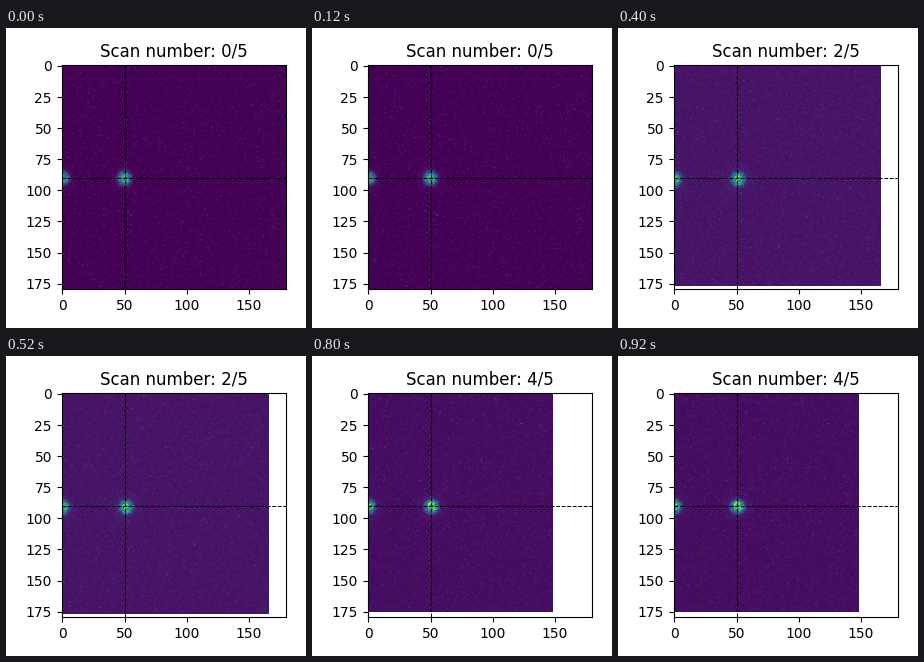
Write a matplotlib script that moves like this. It is 300 px wide and 300 px high and loops after 1 s.

```python
import numpy as np
import matplotlib.pyplot as plt
from matplotlib.animation import FuncAnimation

SIZE = 180
SCANS = 5


def scan_shape(n):
    """Rows and columns left after n scans."""
    cols = min(SIZE, round(183 - 8.7 * n))
    rows = SIZE - round(2.8 * n ** 0.18)
    return rows, cols


def spot(x, y, cx, cy):
    """Flat-topped core with a faint halo."""
    r2 = (x - cx) ** 2 + (y - cy) ** 2
    return np.exp(-(r2 / 29) ** 2) + 0.1 * np.exp(-r2 / 70)


def scan_image(n):
    shape = scan_shape(n)
    rng = np.random.default_rng(n)
    y, x = np.indices(shape)
    swing = np.sin(np.pi * n / SCANS)
    grain = rng.normal(size=shape) ** 2
    background = 0.052 * swing + 0.011 * (grain - 0.4)
    cy = 90.4 + 0.6 * swing
    signal = spot(x, y, 49.6 + 1.4 * swing, cy) + spot(x, y, -0.3, cy)
    speckle = rng.uniform(0.4, 1.1, shape)
    return background + (0.66 + 0.04 * n) * signal * speckle


fig, ax = plt.subplots(figsize=(3, 3), dpi=100)
images = [scan_image(n) for n in range(SCANS)]


def draw(n):
    ax.clear()
    ax.imshow(images[n], cmap="viridis", vmin=0, vmax=1)
    ax.axhline(90, color="black", ls="--", lw=0.75)
    ax.axvline(50, color="black", ls="--", lw=0.75)
    ax.set(xlim=(-0.5, SIZE - 0.5), ylim=(SIZE - 0.5, -0.5),
           xticks=range(0, SIZE, 50), yticks=range(0, SIZE, 25))
    ax.set_title(f"Scan number: {n}/{SCANS}")


draw(0)
fig.tight_layout()
anim = FuncAnimation(fig, draw, frames=SCANS, interval=200,
                     init_func=lambda: draw(0), repeat=True, repeat_delay=0)
plt.show()
```
